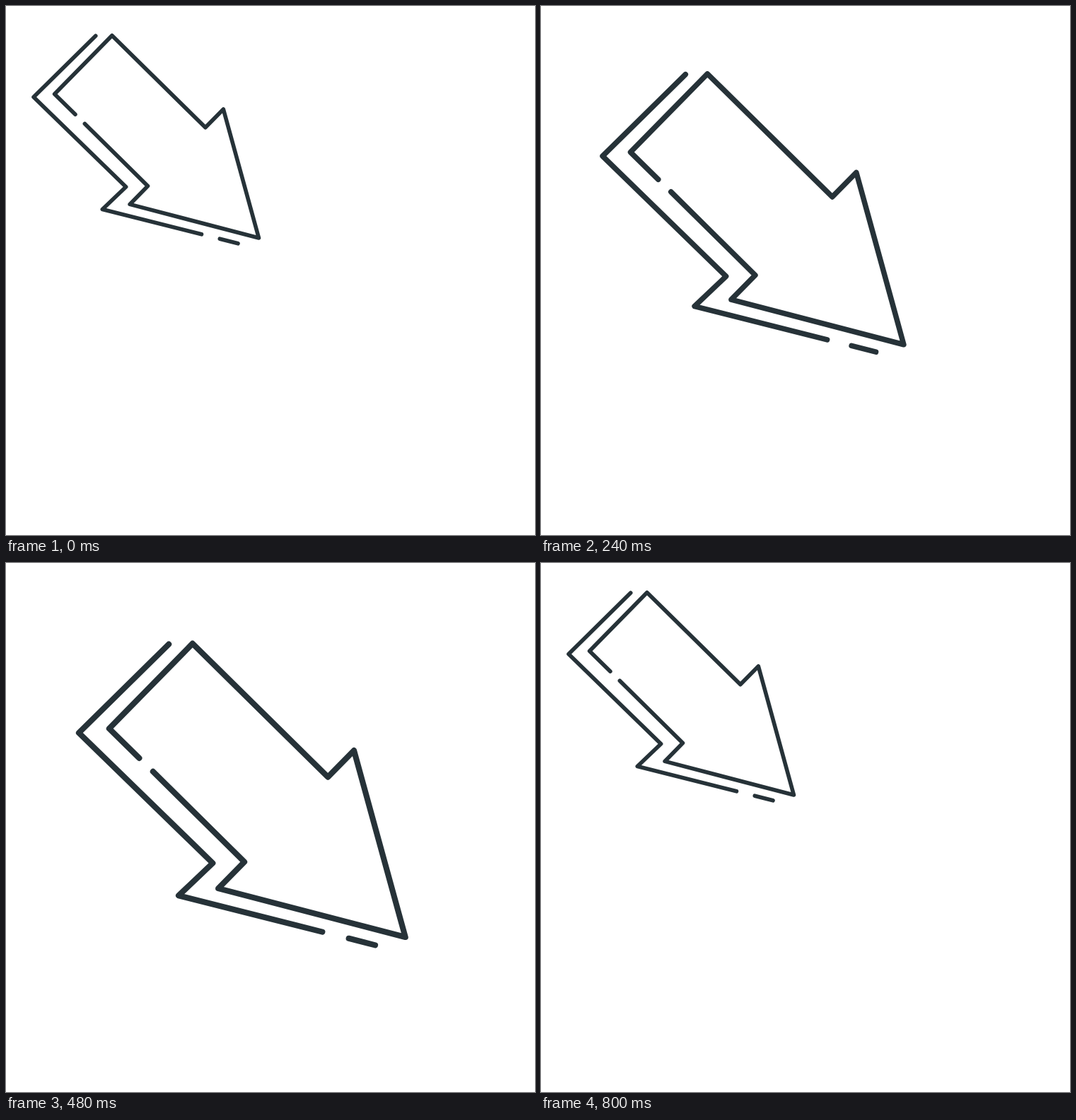
Recreate the animation shown at these times as an HTML page. Size 748 by 748 pixels, loop 0.84 s.

```html
<!DOCTYPE html>
<html lang="en">
<head>
<meta charset="utf-8">
<title>Arrow</title>
<style>
  html, body { margin: 0; height: 100%; overflow: hidden; background: #fff; }
  svg { display: block; width: 100%; height: 100%; }
</style>
</head>
<body>
<svg viewBox="0 0 748 748">
  <g id="arrow" fill="none" stroke="#263238" stroke-width="8.8" stroke-linecap="round" stroke-linejoin="round">
    <path d="M211 306.5 165.2 261.5 292.2 132 498.5 335.3 538.2 295 616.5 579.3 331.5 505 371.2 464.7 232 327"/>
    <path d="M256 133 119 268 323 466.5 271 516 490 571.3M530.3 581.2 570.5 591.5"/>
  </g>
</svg>
<script>
  const STEP = 40, STEPS = 21, PEAK = 10;
  const MIN_SCALE = 0.64;
  const arrow = document.getElementById('arrow');

  // Grows and shrinks linearly in 40 ms steps, about a point off the top left.
  function draw() {
    const step = Math.floor(performance.now() / STEP) % STEPS;
    const away = Math.abs(step - PEAK) / PEAK;
    const scale = 1 - (1 - MIN_SCALE) * away;
    arrow.setAttribute('transform', `translate(${-37.1 * away} ${-42.8 * away}) scale(${scale})`);
    requestAnimationFrame(draw);
  }
  draw();
</script>
</body>
</html>
```
